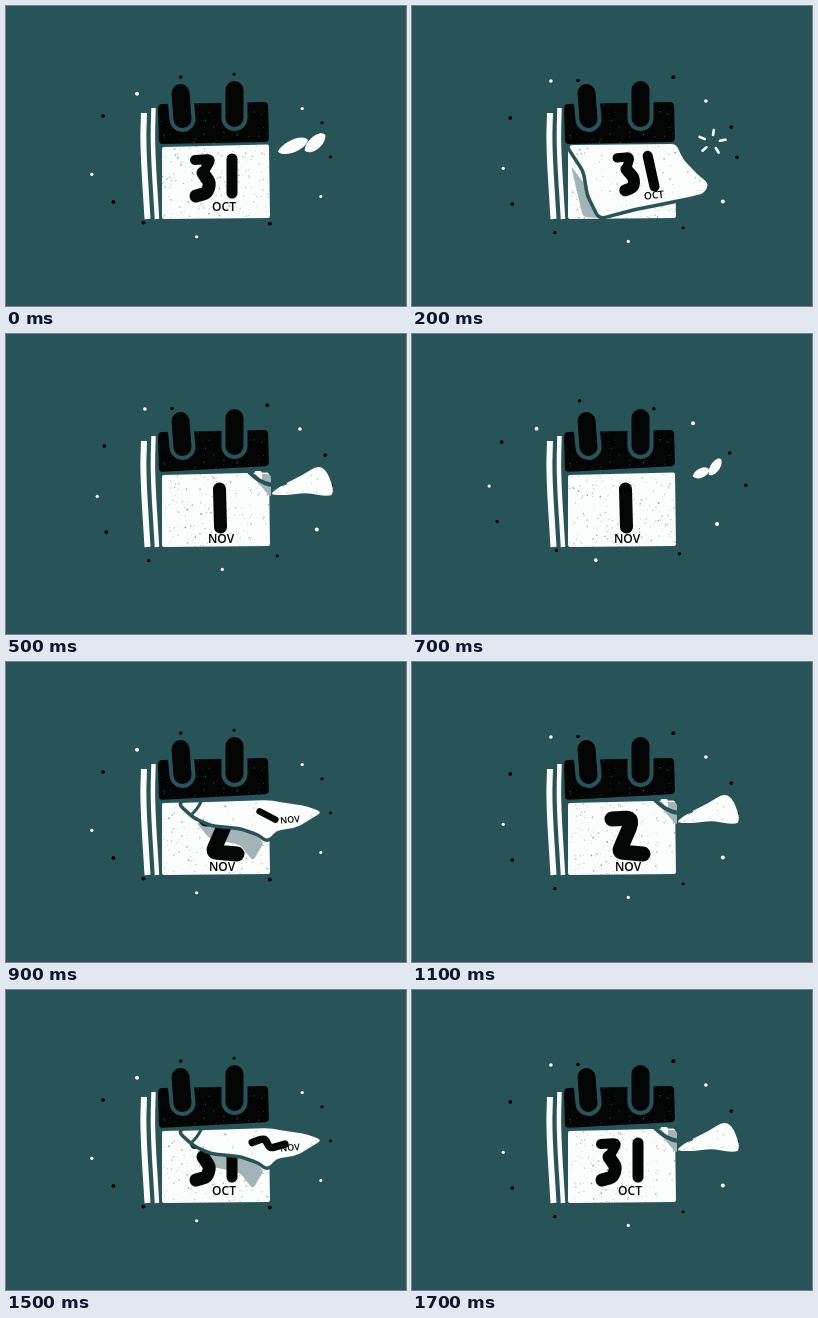
Recreate the animation shown at these times as an HTML page with a canvas. Size 400 by 300 pixels, loop 1.8 s.

```html
<!DOCTYPE html>
<html lang="en">
<head>
<meta charset="utf-8">
<title>Tear-off calendar</title>
<style>
html, body { margin: 0; width: 100%; height: 100%; overflow: hidden; background: #295457; }
canvas { display: block; width: 400px; height: 300px; }
</style>
</head>
<body>
<canvas id="stage" width="400" height="300"></canvas>
<script>
const ctx = document.getElementById('stage').getContext('2d');
const TEAL = '#295457', WHITE = '#fbfcfc', BLACK = '#030404', SHADE = '#a3b4b6';
const STEP = 100, PHASES = 6;

// Flat "x,y x,y" strings become point pairs.
const pts = text => text.split(' ').map(p => p.split(',').map(Number));

const PAGES = [
  { word: 'OCT', x: 218, y: 202, marks: [
    { path: pts('189,154 205,153 197,167'), pen: 10 },
    { path: pts('197,167 204,177 201,187 190,190'), pen: 13 },
    { path: pts('226,153 226,187'), pen: 11 }] },
  { word: 'NOV', x: 215, y: 206, marks: [{ path: pts('213.5,155 214.5,193'), pen: 13 }] },
  { word: 'NOV', x: 216, y: 206, marks: [{ path: pts('200,157 218,156 219,162 207,190 231,192'), pen: 15 }] }
];

// Torn sheet: from the hinge along the lower edge to the tip and back.
const PEELED = pts('156,139 173,165 177,189 188,211 222,202 257,195 282,190 292,187 297,178 284,167 271,153 264,138');
const FOLDED = pts('174,141 188,154 205,162 235,165 252,171 262,178 270,169 292,165 316,150 300,144 280,141 262,138');
const FLYING = pts('264,160 270,161 281,161 290,160 299,159 308,160 318,162 329,161 322,138 312,131 297,141 276,151');

const blend = (from, to, k) => from.map((p, i) => p.map((v, axis) => v + (to[i][axis] - v) * k));

const LIFTS = {
  2: { shape: PEELED, round: 5, shade: '159,160 174,180 190,212 171,211',
    pose: { matrix: [.83, -.03, .2, .9, 17.5, 19], pen: .92, label: [242, 190, .85, -.1] } },
  3: { shape: FOLDED, round: 5, shade: '190,160 203,176 234,183 247,199 258,180 235,165',
    pose: { matrix: [.6, -.2, .4, .22, 63.5, 158], pen: .5, label: [284, 158.5, .75, -.1] } },
  4: { shape: blend(FOLDED, FLYING, .5), round: 7, shade: '229,155 252,165 263,182 264,160' },
  5: { shape: FLYING, round: 20, shade: '244,140 254,151 265,164 265,140' }
};

function random(seed) {
  return () => (seed = (seed * 16807) % 2147483647) / 2147483647;
}

// Builds a path whose corners are eased over the given distance.
function trace(points, round, closed) {
  const n = points.length;
  const toward = (a, b) => {
    const dx = b[0] - a[0], dy = b[1] - a[1], d = Math.hypot(dx, dy) || 1;
    const k = Math.min(round, d / 2) / d;
    return [a[0] + dx * k, a[1] + dy * k];
  };
  ctx.beginPath();
  if (!closed) ctx.moveTo(...points[0]);
  for (let i = closed ? 0 : 1; i < (closed ? n : n - 1); i++) {
    const p = points[i];
    ctx.lineTo(...toward(p, points[(i + n - 1) % n]));
    ctx.quadraticCurveTo(...p, ...toward(p, points[(i + 1) % n]));
  }
  if (closed) ctx.closePath();
  else ctx.lineTo(...points[n - 1]);
}

function stroke(points, width, color, round = 4) {
  trace(points, round, false);
  ctx.lineWidth = width;
  ctx.strokeStyle = color;
  ctx.stroke();
}

function blob(points, color, round, outline = 0) {
  trace(points, round, true);
  if (outline) {
    ctx.lineWidth = outline;
    ctx.strokeStyle = TEAL;
    ctx.stroke();
  }
  ctx.fillStyle = color;
  ctx.fill();
}

function dot(x, y, r, color) {
  ctx.fillStyle = color;
  ctx.beginPath();
  ctx.arc(x, y, r, 0, Math.PI * 2);
  ctx.fill();
}

// Chalky grain inside the current path.
function grain(seed, count, color, x, y, w, h) {
  const next = random(seed);
  ctx.save();
  ctx.clip();
  for (let i = 0; i < count; i++) {
    ctx.globalAlpha = .15 + next() * .4;
    dot(x + next() * w, y + next() * h, .3 + next() * .6, color);
  }
  ctx.restore();
}

function drawMarks(marks, [a, b, c, d, e, f] = [1, 0, 0, 1, 0, 0], scale = 1) {
  for (const { path, pen } of marks) {
    const moved = path.map(([x, y]) => [a * x + c * y + e, b * x + d * y + f]);
    stroke(moved, pen * scale, BLACK);
  }
}

function label(word, x, y, scale = 1, turn = 0) {
  ctx.save();
  ctx.translate(x, y);
  ctx.rotate(turn);
  ctx.scale(scale, scale);
  ctx.fillStyle = BLACK;
  ctx.fillText(word, 0, 0);
  ctx.restore();
}

// Flecks boil on a loose oval around the calendar.
function flecks(variant) {
  const next = random(4001 + variant * 977), count = 13;
  for (let i = 0; i < count; i++) {
    const angle = (i + next() * .7) / count * Math.PI * 2;
    const reach = .88 + next() * .14;
    const x = 205 + 130 * reach * Math.cos(angle);
    const y = 150 + 87 * reach * Math.sin(angle);
    dot(x, y, 1.5 + next() * .5, i % 5 % 2 ? WHITE : BLACK);
  }
}

function edges() {
  ctx.lineCap = 'butt';
  for (let i = 0; i < 2; i++) {
    const x = 138 + i * 9.5, top = 107 - i * 5;
    stroke([[x, top], [x - 1, 140], [x + 3.5, 213]], 6 - i * 1.5, WHITE, 40);
  }
  ctx.lineCap = 'round';
}

function binder(phase) {
  const right = phase % 2 ? 132 : 136;
  blob([[152, 98], [262, 96], [263, right], [153, 138]], BLACK, 4);
  grain(91, 90, '#56696b', 152, 97, 112, 40);
  for (let i = 0; i < 2; i++) {
    const x = 174.5 + i * 54, top = 87 - i * 3, bottom = 113 - i;
    const foot = [x + 2 - i * 2, bottom];
    stroke([[x, 92], foot], 26, TEAL);
    stroke([[x, top], foot], 18, BLACK);
  }
}

function lift(phase, page) {
  const { shape, round, pose } = LIFTS[phase];
  blob(shape, WHITE, round, phase < 5 ? 7 : 0);
  grain(37 + phase, 130, TEAL, 165, 140, 150, 70);
  if (phase === 3) stroke(pts('195,140 191,147 186,152'), 3, TEAL);
  if (phase === 5) {
    blob(pts('248,137 256,137 256,149'), WHITE, 2);
    stroke(pts('243,138 253,147 267,152 279,149'), 4, TEAL, 12);
  }
  if (pose) {
    drawMarks(page.marks, pose.matrix, pose.pen);
    label(page.word, ...pose.label);
  }
}

function leaf(x, y, length, width, angle) {
  ctx.save();
  ctx.translate(x, y);
  ctx.rotate(angle);
  const l = length / 2, w = width * .7;
  ctx.fillStyle = WHITE;
  ctx.beginPath();
  ctx.moveTo(-l, 0);
  ctx.bezierCurveTo(-l / 2, -w, l, -w, l, 0);
  ctx.bezierCurveTo(l * .6, w, -l * .8, w, -l, 0);
  ctx.fill();
  ctx.restore();
}

// The torn sheet shrinks to two leaves as it blows away.
function scraps(phase) {
  const size = 1 - phase * .45;
  leaf(287 + phase * 2, 140 - phase, 32 * size, 12 - phase * 3, -.35);
  leaf(309 - phase * 6, 137 - phase * 4, 26 - phase * 6, 12 - phase * 3, -.65 - phase * .25);
}

function sparks() {
  for (let i = 0; i < 5; i++) {
    const angle = -2.7 + i * Math.PI * .4;
    const at = r => [300 + r * 1.15 * Math.cos(angle), 136 + r * Math.sin(angle)];
    stroke([at(7), at(12)], 2.6, WHITE);
  }
}

function draw(step) {
  const phase = step % PHASES;
  const index = Math.floor(step / PHASES);
  const page = PAGES[index];
  const base = phase < 2 ? page : PAGES[(index + 1) % PAGES.length];

  ctx.fillStyle = TEAL;
  ctx.fillRect(0, 0, 400, 300);
  flecks(step % 3);
  edges();
  blob(pts('156,141 263,138.5 264,212 156,213'), WHITE, 2);
  grain(11 + phase, 190, TEAL, 156, 140, 108, 73);
  if (phase > 1) blob(pts(LIFTS[phase].shade), SHADE, 4);
  if (phase !== 2) {
    drawMarks(base.marks);
    label(base.word, base.x, base.y);
  }
  if (phase > 1) lift(phase, page);
  binder(phase);
  if (phase < 2) scraps(phase);
  if (phase === 2) sparks();
}

ctx.lineCap = ctx.lineJoin = 'round';
ctx.font = '600 12px "Open Sans", sans-serif';
ctx.textAlign = 'center';
ctx.textBaseline = 'middle';
let shown = -1;
function tick() {
  const step = Math.floor(performance.now() / STEP) % (PHASES * PAGES.length);
  if (step !== shown) draw(shown = step);
  requestAnimationFrame(tick);
}
tick();
</script>
</body>
</html>
```
